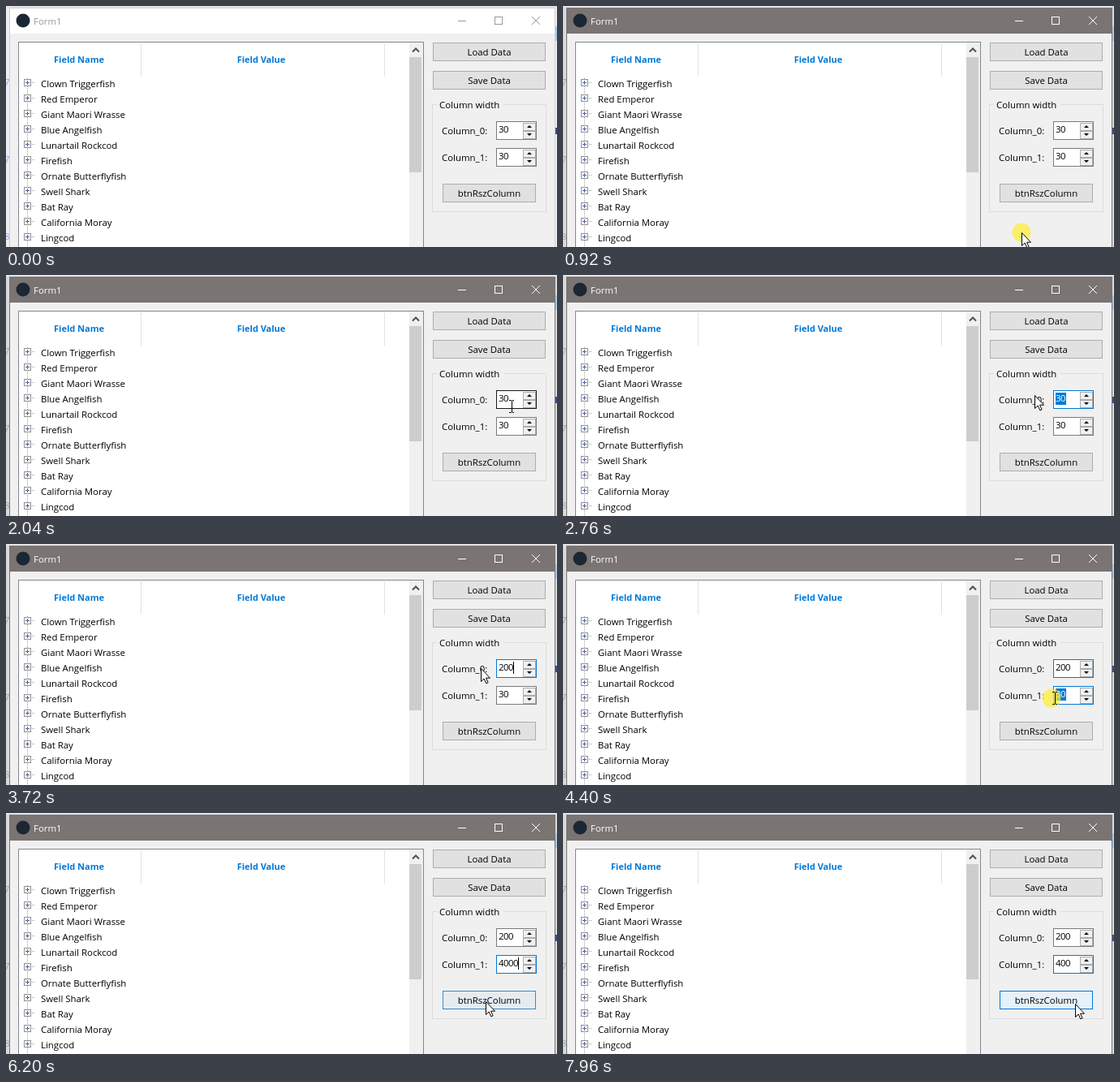
An HTML page for the animation above (8000 ms loop, 679x297 px).

```html
<!DOCTYPE html>
<html lang="en">
<head>
<meta charset="utf-8">
<title>Form1</title>
<style>
html, body { margin: 0; width: 100%; height: 100%; overflow: hidden; }
svg { display: block; }
rect, .crisp { shape-rendering: crispEdges; }
text { font: 11.4px "Open Sans", "Noto Sans", sans-serif; white-space: pre; }
.head { font-size: 11px; font-weight: bold; fill: #0078d7; }
.mid { text-anchor: middle; }
.num { letter-spacing: -.5px; }
</style>
</head>
<body>
<svg id="stage" width="679" height="297" viewBox="0 0 679 297"></svg>
<script>
const stage = document.getElementById('stage');

function add(tag, attrs, text) {
  const el = document.createElementNS('http://www.w3.org/2000/svg', tag);
  set(el, attrs);
  if (text) el.textContent = text;
  return stage.appendChild(el);
}
function set(el, attrs) {
  for (const k in attrs) el.setAttribute(k, attrs[k]);
}
const rect = (x, y, width, height, fill) => add('rect', { x, y, width, height, fill });
// Box with a one pixel border inside its bounds
const box = (x, y, w, h, fill, stroke) =>
  add('rect', { x: x + .5, y: y + .5, width: w - 1, height: h - 1, fill, stroke });
const path = (d, stroke, fill = 'none', more) => add('path', { d, stroke, fill, ...more });
const crisp = (d, stroke, more) => path(d, stroke, 'none', { class: 'crisp', ...more });
const dots = d => crisp(d, '#a0a0a0', { 'stroke-dasharray': '1 1' });
const label = (x, y, s, cls = '', fill = '#000') => add('text', { x, y, class: cls, fill }, s);
const show = (el, on) => el.setAttribute('visibility', on ? 'visible' : 'hidden');

// Editor behind the window
const back = rect(0, 2, 679, 295);
rect(0, 0, 679, 2, '#e4e4e8');
const marks = [...'778'].map((s, i) => label(-2, 98 + 95 * i, s));
rect(677, 25, 2, 18, '#a9c8ea');
rect(677, 150, 2, 8, '#3c4a90');

// Window and title bar
const edge = rect(4, 2, 673, 295);
const bar = rect(5, 3, 671, 31);
rect(5, 34, 671, 263, '#f0f0f0');
add('circle', { cx: 21, cy: 18, r: 8.5, fill: '#1b2733' });
const caption = label(34, 23, 'Form1');
const controls = crisp('M557 18.5h10M602.5 13.5h9v9h-9z');
const cross = path('M648 13l10 10m0-10l-10 10');

// Tree
box(15, 44, 500, 260, '#fff', '#828790');
for (const x of [166, 466]) rect(x, 46, 1, 41, '#e2e2e2');
label(90, 70, 'Field Name', 'head mid');
label(314.5, 70, 'Field Value', 'head mid');
rect(497, 45, 17, 252, '#f0f0f0');
rect(497, 63, 15, 142, '#cdcdcd');
path('M501 56.5l4-4 4 4', '#505050', 'none', { 'stroke-width': 2 });
dots('M26.5 89V297');
['Clown Triggerfish', 'Red Emperor', 'Giant Maori Wrasse', 'Blue Angelfish',
 'Lunartail Rockcod', 'Firefish', 'Ornate Butterflyfish', 'Swell Shark',
 'Bat Ray', 'California Moray', 'Lingcod'].forEach((name, i) => {
  const y = 94 + 19 * i;
  dots(`M32 ${y + .5}h4`);
  box(22, y - 4, 9, 9, '#fff', '#919191');
  crisp(`M24 ${y + .5}h5m-2.5 -2.5v5`, '#4b63a7');
  label(43, y + 6, name);
});

// Right panel
function button(x, y, w, text) {
  const el = box(x, y, w, 23, '#e1e1e1', '#adadad');
  label(x + w / 2, y + 16, text, 'mid');
  return el;
}
button(526, 45, 139, 'Load Data');
button(526, 80, 139, 'Save Data');
box(525, 121, 141, 133, 'none', '#dcdcdc');
rect(531, 120, 82, 3, '#f0f0f0');
label(534, 126, 'Column width');
const resize = button(538, 219, 115, 'btnRszColumn');

// Each field is pressed, typed into one key per step, and left at blur
function spin(y, name, script) {
  label(537, y + 16, name);
  const frame = box(604, y, 50, 23, '#fff');
  for (const dy of [2, 12]) box(637, y + dy, 16, 10, '#f0f0f0', '#adadad');
  path(`M642 ${y + 8}h6l-3 -3zM642 ${y + 15}h6l-3 3z`, 'none', '#000');
  return {
    y, frame, ...script,
    mark: rect(607, y + 3, 13, 15, '#0078d7'),
    text: label(607, y + 14, '', 'num'),
    caret: rect(607, y + 3, 1, 15)
  };
}
const fields = [
  spin(142, 'Column_0:', { press: 2200, blur: 4320, type: 3200, step: 120, keys: '200' }),
  spin(175, 'Column_1:', { press: 4320, blur: 8000, type: 5560, step: 160, keys: '4000', erase: 7280 })
];

// Pointer
const halo = add('circle', { r: 11.5, fill: '#ffee30', opacity: .7 });
const arrow = path('M.5 .5v16l3.7-3.5 2.6 5.8 2.3-1-2.6-5.6h5z', '#000', '#fff');
const beam = crisp('M1 -7.5h2.5m1 0H7M4 -7V7M1 7.5h2.5m1 0H7', '#000');

const moves = [
  { at: 480, ms: 360, to: [565, 279] },
  { at: 1040, ms: 560, to: [619, 162] },
  { at: 2200, ms: 120, to: [588, 155] },
  { at: 2480, ms: 160, to: [581, 148] },
  { at: 3640, ms: 360, to: [612, 190] },
  { at: 4320, ms: 160, to: [591, 189] },
  { at: 5760, ms: 320, to: [591, 232] },
  { at: 7480, ms: 80, to: [631, 239] },
  { at: 7760, ms: 200, to: [631, 235] }
];
const presses = [880, 2200, 4320];
const hides = [0, 3200, 4920, 7280];  // hidden until the next move

const ease = p => p * p * (3 - 2 * p);
const clamp = v => Math.min(1, Math.max(0, v));
const last = (times, t) => Math.max(...times.filter(v => v <= t));

function pointer(t) {
  let pos = [572, 296];
  for (const m of moves) {
    const p = ease(clamp((t - m.at) / m.ms));
    pos = pos.map((v, i) => v + (m.to[i] - v) * p);
  }
  return pos.map(Math.round);
}
function over(x, y, w, t) {
  const [px, py] = pointer(t);
  return px >= x && px < x + w && py >= y && py < y + 23;
}
// Hover glow follows the pointer with a short delay and fade
const glow = (x, y, w, t) =>
  [160, 200, 240].filter(lag => over(x, y, w, t - lag)).length / 3;
const mix = (a, b, p) => `rgb(${a.map((v, i) => Math.round(v + (b[i] - v) * p))})`;
const gray = v => [v, v, v];
const BLUE = [0, 120, 215];

function drawField(f, t) {
  const count = Math.min(f.keys.length, Math.floor((t - f.type) / f.step) + 1);
  const erased = t >= f.erase;
  const text = count > 0 ? f.keys.slice(0, count - erased) : '30';
  const marked = t >= f.press + 80 && t < f.type;
  const edited = erased ? f.erase : count > 0 ? f.type + f.step * (count - 1) : f.press;
  const blue = t >= f.press && t < f.blur + 240;
  set(f.frame, { stroke: blue ? '#0078d7' : mix(gray(122), gray(23), glow(604, f.y, 50, t)) });
  f.text.textContent = text;
  set(f.text, { fill: marked ? '#fff' : '#000' });
  show(f.mark, marked);
  set(f.caret, { x: 607 + (marked ? 0 : 6 * text.length), fill: marked ? '#ff8728' : '#000' });
  show(f.caret, t >= f.press + 80 && t < f.blur && (t - edited) % 1060 < 530);
}

function draw(t) {
  const active = t >= 880;
  const ink = active ? '#fff' : '#999';
  set(back, { fill: active ? '#dadada' : '#eceef5' });
  for (const m of marks) set(m, { fill: active ? '#a3a3a8' : '#a59ad0' });
  set(edge, { fill: active ? '#7a7473' : '#d0d0d0' });
  set(bar, { fill: active ? '#7a7473' : '#fff' });
  set(caption, { fill: ink });
  for (const el of [controls, cross]) set(el, { stroke: ink });

  const h = glow(538, 219, 115, t);
  set(resize, { fill: mix(gray(225), [229, 241, 251], h), stroke: mix(gray(173), BLUE, h) });
  for (const f of fields) drawField(f, t);

  const [x, y] = pointer(t);
  const visible = last(moves.map(m => m.at), t) > last(hides, t);
  const editing = fields.some(f => over(600, f.y, 37, t));
  for (const el of [halo, arrow, beam]) set(el, { transform: `translate(${x} ${y})` });
  show(halo, visible && t - last(presses, t) < 240);
  show(arrow, visible && !editing);
  show(beam, visible && editing);
}

function tick() {
  draw(Math.floor(performance.now() % 8000 / 40) * 40);
  requestAnimationFrame(tick);
}
tick();
</script>
</body>
</html>
```
